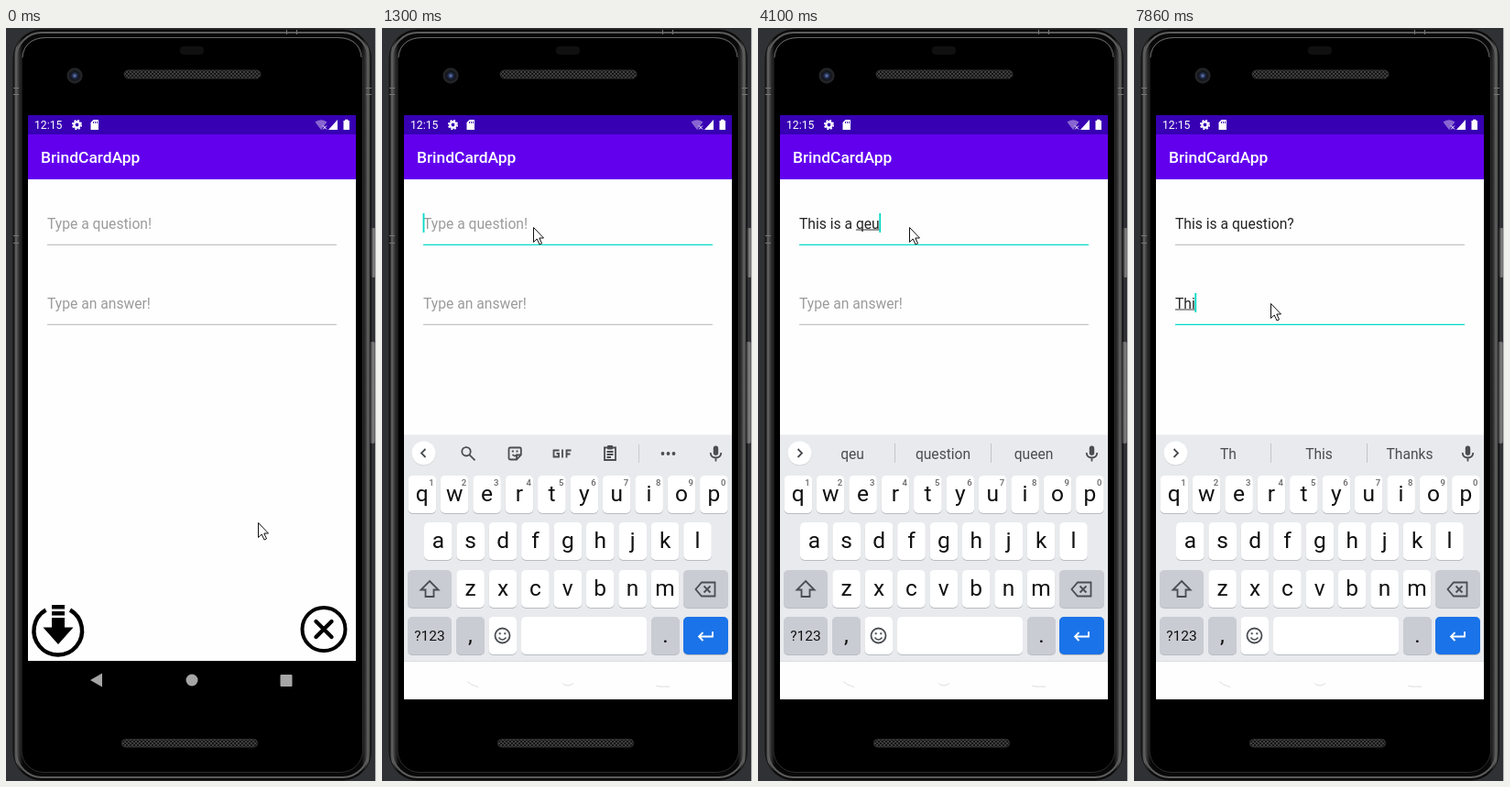
An HTML page that plays this animation: 404x821 px, repeating every 8 s.

```html
<!DOCTYPE html>
<html lang="en">
<head>
<meta charset="utf-8">
<title>BrindCardApp</title>
<style>
html, body { margin: 0; width: 100%; height: 100%; overflow: hidden; background: #303134; }
svg { display: block; width: 404px; height: 821px; }
text { font-family: Roboto, sans-serif; white-space: pre; }
.mid { text-anchor: middle; }
.field { font-size: 15.67px; }
.line { fill: none; stroke: #4a4d51; stroke-width: 1.8; }
</style>
</head>
<body>
<svg id="stage" viewBox="0 0 404 821">
  <defs>
    <linearGradient id="metal">
      <stop offset="0" stop-color="#0c0c0c"/><stop offset=".008" stop-color="#626262"/>
      <stop offset=".016" stop-color="#303030"/><stop offset=".026" stop-color="#080808"/>
      <stop offset=".974" stop-color="#080808"/><stop offset=".984" stop-color="#303030"/>
      <stop offset=".992" stop-color="#626262"/><stop offset="1" stop-color="#0c0c0c"/>
    </linearGradient>
    <linearGradient id="button">
      <stop offset="0" stop-color="#2c2c2c"/><stop offset=".6" stop-color="#858585"/><stop offset="1" stop-color="#5a5a5a"/>
    </linearGradient>
    <radialGradient id="lens">
      <stop offset="0" stop-color="#8196c8"/><stop offset=".2" stop-color="#34436e"/>
      <stop offset=".5" stop-color="#10141f"/><stop offset=".7" stop-color="#1c1d20"/><stop offset="1" stop-color="#2a2b2d"/>
    </radialGradient>
    <pattern id="mesh" width="4" height="4" patternUnits="userSpaceOnUse">
      <rect width="4" height="4" fill="#161616"/>
      <path d="M0 0L4 4M4 0L0 4" stroke="#444" stroke-width=".9"/>
    </pattern>
    <clipPath id="screen"><rect x="24" y="95" width="358" height="637"/></clipPath>
  </defs>

  <g id="phone">
    <rect width="404" height="821" fill="#303134"/>
    <rect x="8" y="2" width="390.500" height="818" rx="31" fill="url(#metal)" stroke="#101010"/>
    <rect x="11" y="5" width="384.500" height="812" rx="28" fill="none" stroke="#5c5c5c" stroke-width="2"/>
    <rect x="17" y="10.500" width="372.500" height="801" rx="24" fill="#000" stroke="#2c2c2c"/>
    <path d="M18 32Q20 11 44 10.500H362Q386 11 388 32" fill="none" stroke="#666"/>
    <path d="M8 65.500H14M8 72.500H14M8 226.500H14M8 234.500H14M393 65.500H399M393 72.500H399M306.500 2V7M317.500 2V7" stroke="#777"/>
    <rect x="398.500" y="218" width="5" height="54" rx="2" fill="url(#button)"/>
    <rect x="397.500" y="342" width="5.500" height="111" rx="2" fill="url(#button)"/>
    <path d="M403.500 0V821" stroke="#b4b4b4"/>
    <rect x="190" y="20" width="26" height="9" rx="4" fill="#101010"/>
    <circle cx="75" cy="52" r="8.500" fill="url(#lens)"/>
    <rect x="129" y="46" width="149" height="9" rx="4.500" fill="url(#mesh)" stroke="#303030"/>
    <rect x="126.500" y="775.500" width="148" height="8.500" rx="4" fill="url(#mesh)" stroke="#303030"/>
  </g>

  <g clip-path="url(#screen)">
    <rect x="24" y="95" width="358" height="595" fill="#fefefe"/>
    <rect x="24" y="95" width="358" height="21" fill="#3700b3"/>
    <rect x="24" y="116" width="358" height="49" fill="#6200ee"/>
    <g fill="#fff">
      <text x="31" y="110" font-size="12.200">12:15</text>
      <text x="38" y="147" font-size="17.400" font-weight="500">BrindCardApp</text>
      <g fill="none" stroke="#fff">
        <circle cx="77.500" cy="105.500" r="3.100" stroke-width="2.400"/>
        <circle cx="77.500" cy="105.500" r="4.700" stroke-width="1.800" stroke-dasharray="2.050 1.641"/>
      </g>
      <path d="M95.500 100H101V111H92.500V103Z"/>
      <path d="M95.500 102V104M97.500 102V104M99.500 102V104" stroke="#3700b3" stroke-width=".9"/>
      <path d="M344 111L337.500 102.500Q344 98 350.500 102.500Z" opacity=".4"/>
      <path d="M346 106.500L350 110.500M350 106.500L346 110.500" stroke="#fff"/>
      <path d="M352 111H362V100Z"/>
      <path d="M370 99.800H373.500V101H375V111H368.500V101H370Z"/>
    </g>
    <g id="fields"></g>

    <g id="actions" fill="none" stroke="#000" stroke-width="4.400">
      <path d="M43.500 634.500A26.300 26.300 0 1 0 70 634.500"/>
      <path d="M50 629H64V633.500H50ZM50 636H64V640.500H50ZM50 643H64V653.500H73.500L57 672L40.500 653.500H50Z" fill="#000" stroke="none"/>
      <circle cx="347" cy="655.500" r="23.500" stroke-width="4"/>
      <path d="M338.500 647L355.500 664M355.500 647L338.500 664" stroke-linecap="round"/>
    </g>
    <rect x="24" y="690" width="358" height="42"/>

    <g id="keyboard">
      <rect x="24" y="443.500" width="358" height="247" fill="#e8eaed"/>
      <rect x="24" y="690" width="358" height="60" fill="#fefefe"/>
      <path d="M24 690.500H382" stroke="#dcdee1"/>
      <circle cx="45.500" cy="464.300" r="13" fill="#c9cbce"/>
      <circle cx="45.500" cy="463.500" r="13" fill="#fff"/>
      <path id="chevron" class="line"/>
      <rect x="361.800" y="455.500" width="5.400" height="10.500" rx="2.700" fill="#4a4d51"/>
      <path class="line" d="M358.700 463Q359 468.500 364.500 468.500T370.300 463M364.500 468.500V472.500"/>
      <g id="tools">
        <circle class="line" cx="92" cy="461.800" r="4.700"/>
        <path class="line" d="M95.500 465.300L101.500 471.300"/>
        <path class="line" d="M140 457.500H150.500Q151.800 457.500 151.800 459V465.500L147 470.500H140Q138.500 470.500 138.500 469V459Q138.500 457.500 140 457.500ZM151.500 465.500H147V470M142.500 465Q145 468 147.500 465"/>
        <path d="M141.800 461.500H143.800M146.500 461.500H148.500" stroke="#4a4d51" stroke-width="1.800"/>
        <path class="line" d="M193.500 460.500H187.500V467.500H193V464H190.500M197 459.500V468.500M201.500 468.500V460.500H206.500M201.500 464.500H205.500"/>
        <path class="line" d="M243 457.500H255V471H243ZM245.500 462H252.500M245.500 465H252.500M245.500 468H250"/>
        <rect x="246" y="455" width="6" height="4.500" rx="1" fill="#4a4d51"/>
        <path d="M280.500 454V474" stroke="#c9ccd0"/>
        <g fill="#4a4d51"><circle cx="306.500" cy="464" r="1.900"/><circle cx="312.500" cy="464" r="1.900"/><circle cx="318.500" cy="464" r="1.900"/></g>
      </g>
      <g id="suggestions" font-size="15.600" fill="#4a4d51"><path d="M149.500 453V474M254.500 453V474" stroke="#c2c5c9"/></g>
      <g id="keys"></g>
      <g class="line">
        <path d="M52 603L61.500 612.500H56.500V620H47.500V612.500H42.500Z"/>
        <path d="M349 604.500H363.500V619.500H349L342.500 612ZM351.500 608.500L358.500 615.500M358.500 608.500L351.500 615.500"/>
        <circle cx="131.500" cy="662.500" r="8"/>
        <path d="M127.500 664.500Q131.500 669.500 135.500 664.500" stroke-width="1.500"/>
        <path d="M127.700 660.300H129.700M133.300 660.300H135.300" stroke-width="2"/>
        <path d="M361 658V663.500H346.500M350.500 659L346 663.500L350.500 668" stroke="#fff"/>
      </g>
    </g>

    <g id="nav" fill="#a6a6a6">
      <path d="M92 711L105 703.500V718.500Z"/><circle cx="203" cy="711" r="6.500"/><rect x="299.500" y="705" width="13" height="13" rx="1"/>
    </g>
    <path id="navTrace" d="M93 712.500L98 716L105 718.500M197 714.500Q203 719.500 209 714.500M299.500 717Q301 718.500 314 718" fill="none" stroke="#dedede"/>
  </g>
  <path id="mouse" d="M.5 .5V16.500L4.200 13L7 19L9.500 17.900L6.800 12H11.500Z" fill="#fff" stroke="#111"/>
</svg>

<script>
const LOOP = 8000, LEFT = 45, TEAL = '#03dac5';
const $ = id => document.getElementById(id);
const add = (parent, html) => parent.insertAdjacentHTML('beforeend', html);
const set = (el, attrs) => Object.entries(attrs).forEach(([k, v]) => el.setAttribute(k, v));
const ctx = document.createElement('canvas').getContext('2d');
const measure = s => { ctx.font = '15.67px Roboto, sans-serif'; return ctx.measureText(s).width; };

function key(x, y, w, label = '', fill = '#fff', size = 24.5) {
  add($('keys'), `<rect x="${x}" y="${y + 1}" width="${w}" height="41" rx="5" fill="#b9bcc1"/>
    <rect x="${x}" y="${y}" width="${w}" height="41" rx="5" fill="${fill}"/>
    <text class="mid" x="${x + w / 2}" y="${y + (size > 20 ? 28.3 : 26)}" font-size="${size}" fill="#111">${label}</text>`);
}
function row(letters, x, y) {
  [...letters].forEach((c, i) => key(x + i * 35.4, y, 30.6, c));
}
row('qwertyuiop', 28.5, 488);
row('asdfghjkl', 46, 539);
row('zxcvbnm', 81.3, 591);
[...'1234567890'].forEach((d, i) => add($('keys'),
  `<text class="mid" x="${54 + i * 35.4}" y="498.5" font-size="9.5" font-weight="500" fill="#666">${d}</text>`));
const GREY = '#c9ccd3';
key(28, 591, 48, '', GREY);
key(329, 591, 49, '', GREY);
key(28, 642, 48, '?123', GREY, 15.5);
key(81, 642, 31, ',', GREY);
key(116.5, 642, 30.5);
key(152, 642, 137);
key(294, 642, 31, '.', GREY);
key(329, 642, 49, '', '#1a73e8');

const sugText = [103, 202, 301].map(x => {
  add($('suggestions'), `<text class="mid" x="${x}" y="469.5"/>`);
  return $('suggestions').lastElementChild;
});

const fields = [['question', 'Type a question!', 218.5], ['answer', 'Type an answer!', 305.5]].map(([name, hint, y]) => {
  add($('fields'), `<g><text class="field" x="${LEFT}" y="${y}"/><path stroke="#333"/>
    <path d="M${LEFT} ${y + 17.8}H361" stroke-width="1.3"/><rect y="${y - 16.5}" width="1.8" height="21" fill="${TEAL}"/></g>`);
  const [text, mark, rule, caret] = $('fields').lastElementChild.children;
  return { name, hint, y, text, mark, rule, caret };
});

// Each step holds until the next and changes only what it lists.
const steps = [];
let last = { mouse: [275, 539], focus: '', question: '', answer: '', caret: 1, composing: 1, sug: '', kb: [290, 0] };
const step = (at, patch) => steps.push(last = { ...last, ...patch, at });
const say = (at, question, sug = '') => step(at, { question: 'This is a ' + question, sug });

step(0, {});
[[150, 268, 500], [280, 250, 400], [410, 220, 285], [540, 185, 195], [670, 166, 153], [800, 165, 195]]
  .forEach(([at, ...mouse]) => step(at, { mouse }));
step(930, { mouse: [165, 217], focus: 'question' });
step(1050, { kb: [210, .15] });
step(1180, { kb: [12, 1] });
step(1300, { kb: [0, 1] });
step(1430, { question: 'T' });
step(1570, { question: 'Th', sug: 'T The This' });
step(1700, { question: 'Thi', sug: 'Th This Thanks' });
step(1830, { question: 'This', sug: 'Thi This Think' });
step(1960, { question: 'This ', sug: '' });
step(2100, { question: 'This i' });
step(2230, { question: 'This is', sug: 'i is in' });
step(2400, { question: 'This is ', sug: '' });
step(2530, { question: 'This is a' });
say(2660, '');
say(2790, 'q');
say(2920, 'qe', 'q we question');
say(3040, 'qeu', 'qe we week');
say(3170, 'qeus', 'qeu question queen');
say(3310, 'qeust', 'qeus quest queue');
say(3460, 'qeusti', 'qeust quest question');
say(3580, 'qeust', 'qeusti question questions');
say(3710, 'qeus', 'qeust quest question');
say(3970, 'qeu', 'qeus quest queue');
say(4100, 'qeu', 'qeu question queen');
say(4250, 'qe', 'qeu question queen');
say(4370, 'q', 'qe we week');
say(4650, 'qu', 'q we week');
say(4770, 'que', 'qu question queen');
say(5050, 'quest', 'que question queen');
say(5180, 'questio', 'quest question questions');
say(5310, 'question', 'questio question QUESTION');
say(5460, 'question', 'question questions QUESTION');
step(5830, { caret: 0 });
step(6140, { composing: 0, sug: '' });
step(6510, { question: 'This is a question?', caret: 1 });
step(6640, { mouse: [162, 238] });
step(6760, { mouse: [154, 275] });
step(6880, { mouse: [149, 300] });
step(7010, { focus: 'answer', composing: 1 });
step(7430, { caret: 0 });
step(7560, { answer: 'T', caret: 1 });
step(7710, { answer: 'Th', sug: 'T The This' });
step(7860, { answer: 'Thi', sug: 'Th This Thanks' });

function drawField(f, s) {
  const value = s[f.name], focused = s.focus === f.name;
  const end = LEFT + measure(value), word = value.split(' ').pop();
  f.text.textContent = value || f.hint;
  set(f.text, { fill: value ? '#222' : '#9b9b9b' });
  set(f.mark, { d: focused && s.composing && word ? `M${end - measure(word)} ${f.y + 1.5}H${end}` : '' });
  set(f.rule, { stroke: focused ? TEAL : '#c2c2c2' });
  set(f.caret, { x: end - .4, visibility: focused && s.caret ? 'visible' : 'hidden' });
}

function draw(s) {
  fields.forEach(f => drawField(f, s));
  const [dy, alpha] = s.kb, words = s.sug.split(' ');
  set($('keyboard'), { transform: `translate(0 ${dy})`, opacity: alpha });
  set($('nav'), { visibility: alpha < 1 ? 'visible' : 'hidden' });
  set($('navTrace'), { visibility: alpha < 1 ? 'hidden' : 'visible' });
  set($('tools'), { visibility: s.sug ? 'hidden' : 'visible' });
  set($('suggestions'), { visibility: s.sug ? 'visible' : 'hidden' });
  set($('chevron'), { d: s.sug ? 'M43.5 459L48 463.500L43.500 468' : 'M47.500 459L43 463.500L47.500 468' });
  sugText.forEach((el, i) => { el.textContent = words[i] || ''; });
  set($('mouse'), { transform: `translate(${s.mouse})` });
}

let shown, start = performance.now();
function tick() {
  const t = (performance.now() - start) % LOOP;
  const current = steps.filter(s => s.at <= t).pop();
  if (current !== shown) draw(shown = current);
  requestAnimationFrame(tick);
}
tick();
</script>
</body>
</html>
```
